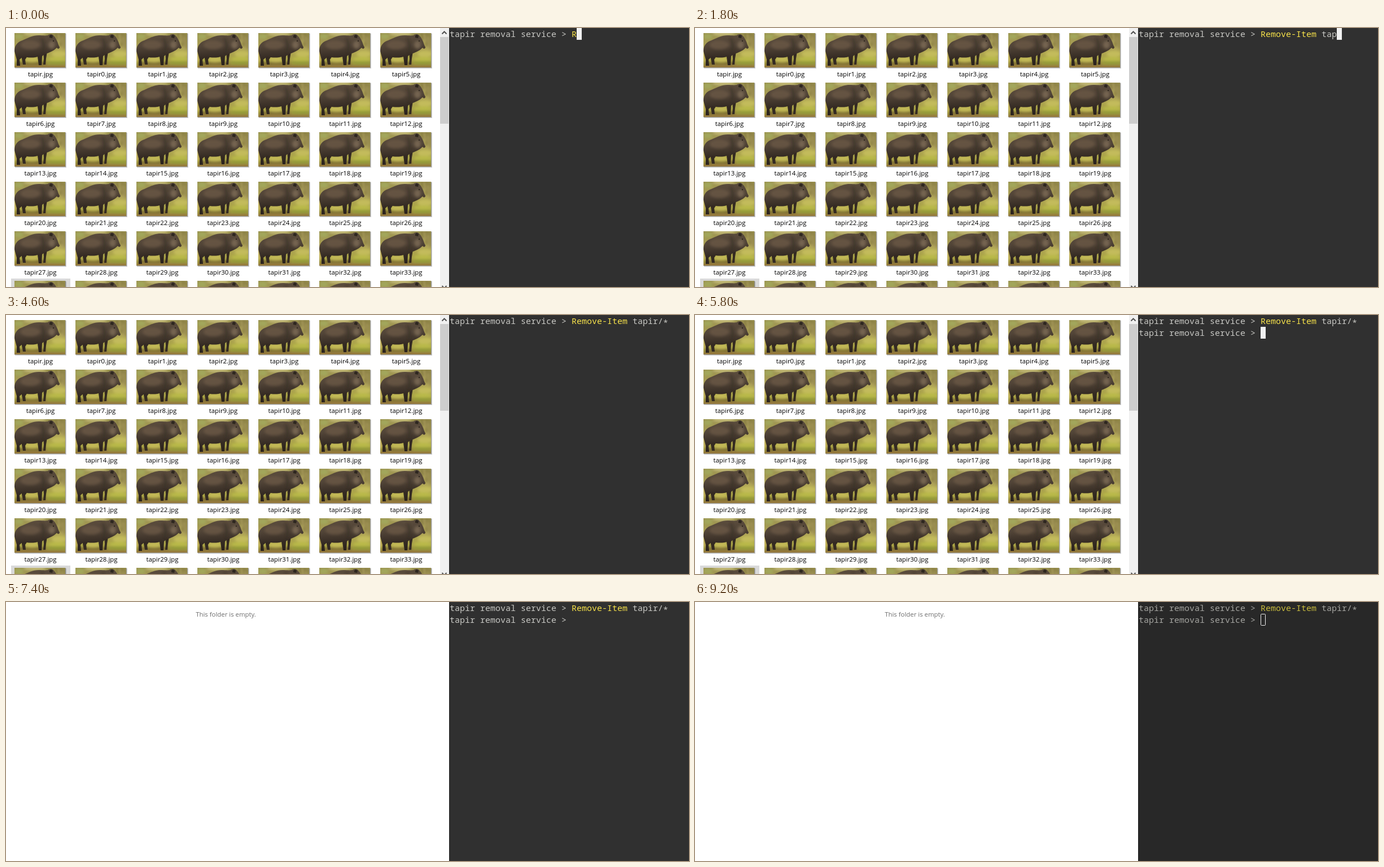
Animation, 1210 px wide and 460 px high, one loop 9400 ms. Source, as an HTML page:

```html
<!DOCTYPE html>
<html lang="en">
<head>
<meta charset="utf-8">
<title>Tapir removal service</title>
<style>
  html, body { margin: 0; width: 100%; height: 100%; overflow: hidden; background: #fff; }
  svg { display: block; width: 1210px; height: 460px; }
  .label { font: 11.4px "Open Sans", "Noto Sans", sans-serif; text-anchor: middle; }
  .term { font: 15px "Noto Sans Mono", "DejaVu Sans Mono", monospace; white-space: pre; }
</style>
</head>
<body>
<svg viewBox="0 0 1210 460" xmlns="http://www.w3.org/2000/svg">
  <defs>
    <linearGradient id="meadow" x2="0" y2="1">
      <stop offset="0" stop-color="#99914f"/>
      <stop offset=".45" stop-color="#aea356"/>
      <stop offset=".8" stop-color="#aaa545"/>
      <stop offset="1" stop-color="#8f8139"/>
    </linearGradient>
    <linearGradient id="hide" x2=".1" y2="1">
      <stop offset="0" stop-color="#5d4e3e"/>
      <stop offset=".4" stop-color="#514437"/>
      <stop offset=".75" stop-color="#362c24"/>
      <stop offset="1" stop-color="#2a221c"/>
    </linearGradient>
    <filter id="soft" x="-20%" y="-20%" width="140%" height="140%"><feGaussianBlur stdDeviation="2"/></filter>
    <filter id="fuzz"><feGaussianBlur stdDeviation=".6"/></filter>
    <clipPath id="crop"><rect width="90" height="61"/></clipPath>
    <g id="photo">
      <rect x="1" y="1" width="91" height="62" fill="#000" opacity=".18"/>
      <rect width="91" height="62" fill="#000" opacity=".22"/>
      <g clip-path="url(#crop)">
        <rect width="90" height="61" fill="url(#meadow)"/>
        <g filter="url(#soft)">
          <ellipse cx="8" cy="6" rx="8" ry="5" fill="#a3a75c"/>
          <ellipse cx="36" cy="1" rx="20" ry="4" fill="#c3b978"/>
          <ellipse cx="2" cy="42" rx="5" ry="9" fill="#bfae58"/>
          <ellipse cx="31" cy="47" rx="12" ry="5" fill="#c3b957"/>
          <ellipse cx="79" cy="37" rx="13" ry="6" fill="#c3bb5c"/>
          <ellipse cx="76" cy="46" rx="16" ry="4" fill="#b9b94a"/>
          <ellipse cx="76" cy="53" rx="18" ry="3" fill="#929a38"/>
          <path d="M74 0L76 12M81 0L83 24M87 2L88 28" stroke="#786b38" stroke-width="3"/>
          <path d="M78 2L80 16M85 6L86 28" stroke="#beb06b" stroke-width="2"/>
          <path d="M4 54H56" stroke="#75642f" stroke-width="4"/>
          <path d="M0 60H90" stroke="#9a6e40" stroke-width="3"/>
        </g>
        <g filter="url(#fuzz)">
          <path d="M13 36L13 45 15 56H20L19 47 25 38ZM51 32L52 45 51 56H55L56 45 58 33Z" fill="#342a22"/>
          <path d="M0 32C0 22 5 16 14 13 23 9 32 4 43 4 49 4 54 5 59 4
            61 2 66 1 69 4 73 8 76 14 78 21L80 25C80 28 77 29 75 26
            72 29 69 31 65 33 61 35 58 36 54 37L49 41 48 57H43L41 42
            C32 45 22 43 15 42L9 47 10 58H4L4 47Z" fill="url(#hide)"/>
        </g>
        <g filter="url(#soft)">
          <ellipse cx="28" cy="21" rx="17" ry="8" fill="#6d5b48" opacity=".7"/>
          <ellipse cx="66" cy="21" rx="6" ry="7" fill="#7d6b55" opacity=".8"/>
          <path d="M48 9C53 17 53 25 50 34" fill="none" stroke="#30271f" stroke-width="4" opacity=".5"/>
        </g>
        <path d="M62 8C61 3 65 2 68 5L67 9Z" fill="#2d261f"/>
        <circle cx="69" cy="14" r="1" fill="#1e1813"/>
      </g>
    </g>
  </defs>
  <rect width="1210" height="460" fill="#fff"/>
  <g id="files">
    <rect x="9" y="445" width="105" height="15" fill="#d9d9d9"/>
    <g id="grid"></g>
    <rect x="769" width="16" height="460" fill="#f0f0f0"/>
    <rect x="769" y="16" width="15" height="154" fill="#cdcdcd"/>
    <path d="M772.5 10.5L776.5 6.5 780.5 10.5M772.5 458L776.5 462 780.5 458" fill="none" stroke="#505050" stroke-width="2"/>
  </g>
  <text id="empty" class="label" x="389.5" y="26" fill="#6d6d6d">This folder is empty.</text>
  <rect id="panel" x="785" width="425" height="460"/>
  <rect x="785" width="1" height="460" opacity=".3"/>
  <g class="term">
    <g id="plain">
      <text x="786" y="16">tapir removal service &gt;</text>
      <text id="prompt" x="786" y="37">tapir removal service &gt;</text>
      <text id="path" x="1110" y="16"></text>
      <text id="star" x="1164" y="19">*</text>
    </g>
    <text id="command" x="1002" y="16"></text>
  </g>
  <rect id="block" width="9" height="21" fill="#f0f0f0"/>
  <rect id="hollow" x="1002.5" y="21.5" width="8" height="20" rx="1" fill="none" stroke="#f0f0f0"/>
</svg>
<script>
  const LOOP = 9400, ENTER = 4800, CLEARED = 6200, BLUR = 8600;
  const CELL = 9, INPUT_X = 1002, LINE = 21;
  const COMMAND = "Remove-Item", PATH = "tapir/";

  // [time, characters typed]
  const typing = [[0, 1], [200, 2], [400, 4], [600, 5], [800, 7], [1000, 8], [1200, 9],
    [1400, 11], [1600, 13], [1800, 15], [2000, 17], [2600, 18], [3000, 19]];
  const blinks = [3600, 4000, 4600, 4800, 5200, 5800, 6400, 6800, 7400, 8000, 8400];

  const $ = id => document.getElementById(id);
  const show = (id, on) => $(id).setAttribute("display", on ? "inline" : "none");
  const mix = (a, b, p) => `rgb(${a.map((v, i) => Math.round(v + (b[i] - v) * p))})`;

  function buildGrid() {
    let out = "";
    for (let i = 0; i < 42; i++) {
      const x = 15 + (i % 7) * 108, y = 9 + Math.floor(i / 7) * 88;
      out += `<use href="#photo" x="${x}" y="${y}"/>` +
        `<text class="label" x="${x + 46}" y="${y + 77}">tapir${i ? i - 1 : ""}.jpg</text>`;
    }
    $("grid").innerHTML = out;
  }

  function draw(t) {
    const typed = typing.filter(([at]) => at <= t).pop()[1];
    const entered = t >= ENTER, cleared = t >= CLEARED, blurred = t >= BLUR;
    const lit = blinks.filter(at => at <= t).length % 2 === 0;
    const fade = blurred ? (Math.floor((t - BLUR) / 200) + 1) / 4 : 0;

    show("files", !cleared);
    show("empty", cleared);
    show("prompt", entered);
    $("command").textContent = COMMAND.slice(0, typed);
    $("path").textContent = PATH.slice(0, Math.max(0, typed - COMMAND.length - 1));
    show("star", typed > 18);

    $("block").setAttribute("x", INPUT_X + (entered ? 0 : typed * CELL));
    $("block").setAttribute("y", entered ? LINE : 0);
    show("block", lit && !blurred);
    show("hollow", blurred);

    $("panel").setAttribute("fill", mix([48, 48, 48], [40, 40, 40], fade));
    $("plain").setAttribute("fill", mix([200, 200, 196], [164, 164, 160], fade));
    $("command").setAttribute("fill", mix([247, 226, 74], [200, 187, 62], fade));
  }

  function tick() {
    draw(performance.now() % LOOP);
    requestAnimationFrame(tick);
  }

  buildGrid();
  draw(0);
  requestAnimationFrame(tick);
</script>
</body>
</html>
```
